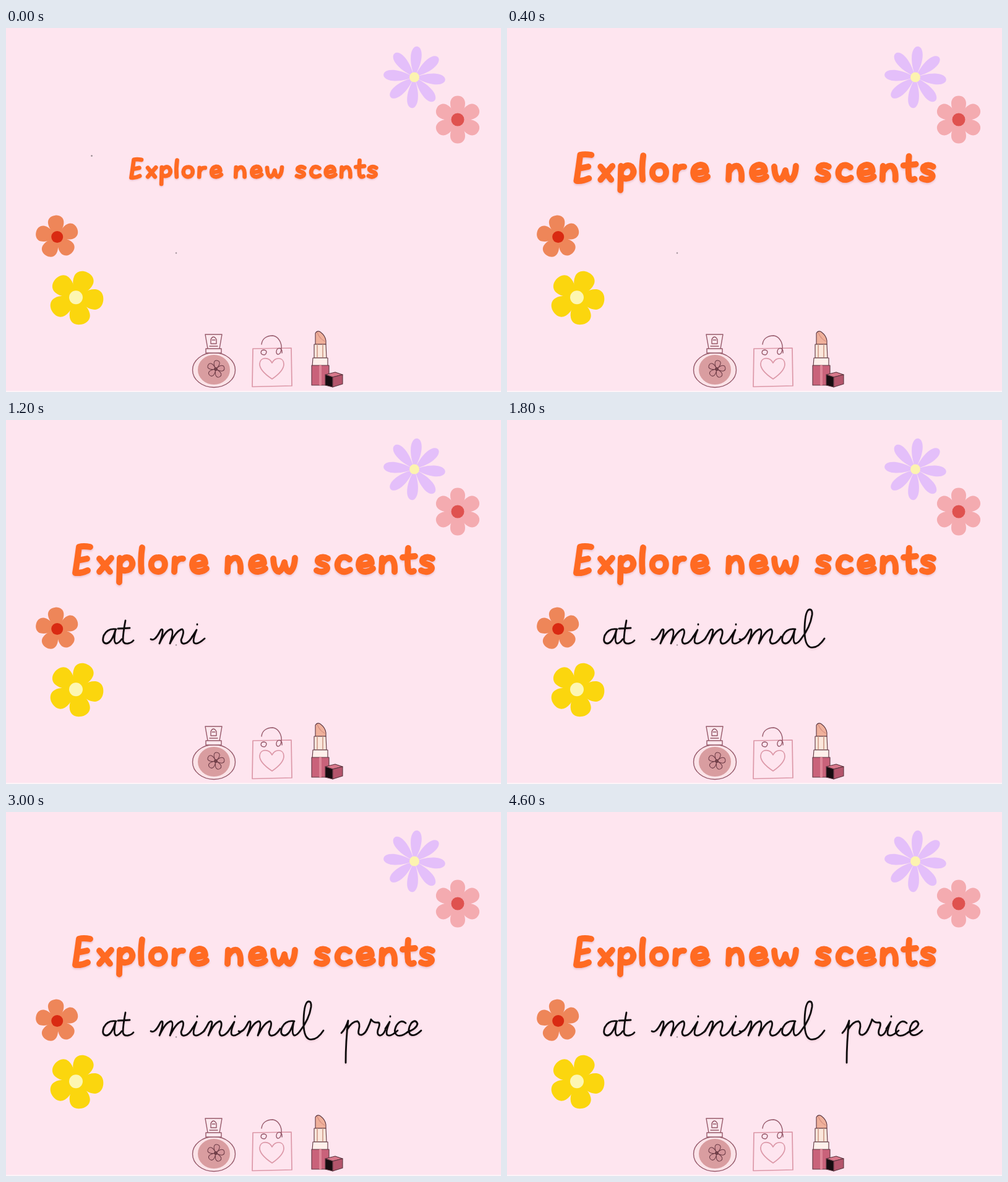
An HTML page that plays this animation: 800x588 px, repeating every 5000 ms.

```html
<!DOCTYPE html>
<html lang="en">
<head>
<meta charset="utf-8">
<title>Explore new scents</title>
<style>
  html, body { margin: 0; width: 100%; height: 100%; overflow: hidden; background: #fee5ef; }
  svg { display: block; width: 100%; height: 100%; }
  path, ellipse { stroke-linecap: round; stroke-linejoin: round; }
  #headline { fill: none; stroke: #ff6a22; stroke-width: 9.8; filter: drop-shadow(0 2px 1.5px rgba(190, 110, 130, .3)); }
  #tagline { fill: none; stroke: #0c0a0b; stroke-width: 2.8; filter: drop-shadow(0 2px 1.5px rgba(190, 110, 130, .2)); }
  .ink { fill: none; stroke: #96596a; stroke-width: 1.4; }
  .rose { fill: none; stroke: #dc98a8; stroke-width: 1.7; }
</style>
</head>
<body>
<svg viewBox="0 0 800 588">
  <rect width="800" height="588" fill="#fee5ef"/>
  <rect y="586" width="800" height="2" fill="#fef3f7"/>
  <circle cx="138.5" cy="206.5" r="1.3" fill="#8f8288"/>
  <circle cx="275" cy="363.5" r="1.2" fill="#a3949b"/>
  <g id="flowers"></g>

  <g id="perfume">
    <ellipse cx="336" cy="552.5" rx="34.5" ry="28" fill="#fbe3e8"/>
    <ellipse cx="336" cy="552" rx="26" ry="24" fill="#d99da0"/>
    <ellipse class="ink" cx="336" cy="552.5" rx="34.5" ry="28"/>
    <path class="ink" d="M322 495H349L345 518H326ZM323 518H348V525H323Z" style="fill:#fce8ee"/>
    <path class="ink" d="M331 510V503Q335 495 340 503V510ZM333 504H338M329 514H342"/>
    <g id="blossom"></g>
  </g>

  <g id="bag">
    <path class="rose" d="M399 518L461 517L462 578L398 579.5Z"/>
    <path class="rose" d="M430 567Q409 553 410 542C411 531 425 531 430 541C434 531 449 531 449 543Q449 554 430 567Z"/>
    <path class="ink" d="M413 511C414 501 422 497 431 497C441 498 446 510 445 518C444 530 436 529 437 522C438 515 447 516 446 525M417 528C410 528 411 520 417 520C424 521 420 528 417 528"/>
  </g>

  <g id="lipstick" stroke="#5c3640" stroke-width="1.1">
    <path d="M500 511V493Q503 488 508 491Q516 497 517 505V511Z" fill="#efb09b"/>
    <path d="M503 492Q507 502 515 506" fill="none" stroke="#d58f80"/>
    <path d="M498 511H517L518 533H498Z" fill="#fbe7dc"/>
    <path d="M503 512V532M512 512V532" fill="none" stroke="#d5a898" stroke-width="2"/>
    <path d="M496 533H520V546H495Z" fill="#fff0eb"/>
    <path d="M494 545H522V577H494Z" fill="#c9627a"/>
    <path d="M508 546V576" stroke="#dd8597" stroke-width="4"/>
    <path d="M516 560L532 556L544 560L528 564Z" fill="#d8788b"/>
    <path d="M516 560L528 564V580L516 577Z" fill="#160c10"/>
    <path d="M528 564L544 560V575L528 580Z" fill="#b4556c"/>
  </g>

  <g id="headline" role="img" aria-label="Explore new scents"></g>
  <g id="tagline" role="img" aria-label="at minimal price"></g>
</svg>
<script>
const LOOP = 5000, STEP = 100;
const el = id => document.getElementById(id);

function add(parent, name, attrs) {
  const node = document.createElementNS('http://www.w3.org/2000/svg', name);
  for (const key in attrs) node.setAttribute(key, attrs[key]);
  return parent.appendChild(node);
}

function petal(w, len) {
  const h = w / 2, y = -len;
  return `M0 0C${-w * .22} ${y * .2} ${-h} ${y * .42} ${-h} ${y * .68}` +
    `C${-h} ${y * .88} ${-w * .28} ${y} 0 ${y}` +
    `C${w * .28} ${y} ${h} ${y * .88} ${h} ${y * .68}` +
    `C${h} ${y * .42} ${w * .22} ${y * .2} 0 0Z`;
}

function flower(parent, x, y, count, turn, w, len, fill, heart, r, stroke = 'none') {
  const g = add(parent, 'g', { transform: `translate(${x} ${y})`, stroke });
  for (let i = 0; i < count; i++)
    add(g, 'path', { d: petal(w, len), fill, transform: `rotate(${turn + i * 360 / count})` });
  add(g, 'circle', { r, fill: heart });
}

const garden = el('flowers');
flower(garden, 660, 79.5, 8, 5, 17.5, 50, '#e4bffa', '#fcf3b0', 8);
flower(garden, 730, 148, 6, 0, 24, 38.5, '#f4abb0', '#df524f', 10.5);
flower(garden, 82.7, 337.5, 5, -5, 25.5, 35, '#ee8659', '#d92a12', 9.5);
flower(garden, 113, 435.3, 5, 24, 33, 44.5, '#fbd60e', '#fdf6b2', 11);
flower(el('blossom'), 339, 551, 5, 10, 9, 14, '#d4959a', '#74424a', 2.5, '#6b3a45');

// Pen strokes of the lettering; repeated letters are shifted along x.
const bold = {
  E: 'M136 205Q125 203 118 205Q115 228 112 247Q122 248 132 243M116 227L131 224',
  x: 'M151 224L168 245M170 223L151 245',
  p: 'M184 223L183 262M185 229Q193 218 201 224Q208 233 200 241Q191 246 185 240',
  l: 'M220 206Q217 226 219 245',
  o: 'M246 222C231 222 231 245 246 245C261 244 260 221 246 222Z',
  r: 'M273 224L272 245M273 233Q277 223 286 224',
  e: 'M302 234Q313 235 322 231Q321 221 312 221Q301 223 301 234Q302 246 313 245Q320 244 324 240',
  n: 'M359 223L358 245M359 232Q366 221 373 223Q380 227 379 245',
  w: 'M432 224Q433 244 441 245Q447 242 450 230Q452 245 459 245Q466 240 467 223',
  s: 'M520 224Q512 219 505 224Q501 230 511 233Q522 236 518 242Q511 248 502 243',
  c: 'M555 225Q548 219 541 223Q533 231 537 240Q544 249 556 242',
  t: 'M650 207Q648 230 650 241Q653 247 659 244M641 222L661 220'
};
const script = {
  a: 'M178 338Q164 336 158 348Q154 360 162 361Q171 360 177 339Q173 359 178 361Q182 361 187 354',
  t: 'M193 324Q189 345 189 356Q190 362 197 361Q203 360 206 356M181 337L200 336',
  m: 'M234 354Q240 358 248 343Q251 336 253 339Q254 345 248 361Q258 339 267 338Q272 340 265 361Q276 339 285 338Q289 341 283 355Q283 364 292 360Q297 357 301 350',
  i: 'M301 350Q305 344 308 339Q301 356 304 360Q309 364 321 353M309 330v.6',
  n: 'M319 355Q324 348 328 340Q333 336 333 341Q332 348 327 361Q337 339 346 338Q351 341 345 355Q345 364 353 360Q358 357 362 350',
  l: 'M475 354Q490 335 493 315Q494 306 489 306Q482 307 481 335Q480 363 490 367Q502 370 513 353',
  p: 'M542 357Q549 350 553 337Q549 370 549 405M551 352Q559 338 568 338Q573 341 570 352Q568 361 575 360Q580 358 583 352',
  r: 'M583 352Q588 342 590 335Q594 341 601 340Q606 340 601 352Q599 361 605 361Q610 360 613 352',
  c: 'M646 341Q638 334 631 345Q625 357 633 361Q641 363 652 353',
  e: 'M648 356Q664 350 665 342Q662 334 655 341Q648 352 653 359Q660 364 671 353'
};

// shifts: offsets for the second and later uses of each letter
function write(group, text, glyphs, shifts) {
  const used = {};
  return [...text].map(ch => {
    if (ch === ' ') return null;
    const n = used[ch] = (used[ch] ?? -1) + 1;
    const dx = n ? shifts[ch][n - 1] : 0;
    return add(group, 'path', { d: glyphs[ch], transform: `translate(${dx} 0)` });
  });
}

const headline = el('headline');
write(headline, 'Explore new scents', bold, { e: [95, 269], n: [249], s: [169] });
const letters = write(el('tagline'), 'at minimal price', script,
  { m: [142], i: [61, 312], a: [288] });

function draw(now) {
  const t = Math.floor(now % LOOP / STEP) * STEP;
  const scale = 1 - .314 * .25 ** (t / 100);
  headline.setAttribute('transform', `translate(400 230) scale(${scale}) translate(-400 -230)`);
  const typed = Math.floor((t - 650) / 110);
  letters.forEach((path, i) => path?.setAttribute('visibility', i < typed ? 'visible' : 'hidden'));
}

const start = performance.now();
function tick() {
  draw(performance.now() - start);
  requestAnimationFrame(tick);
}
tick();
</script>
</body>
</html>
```
